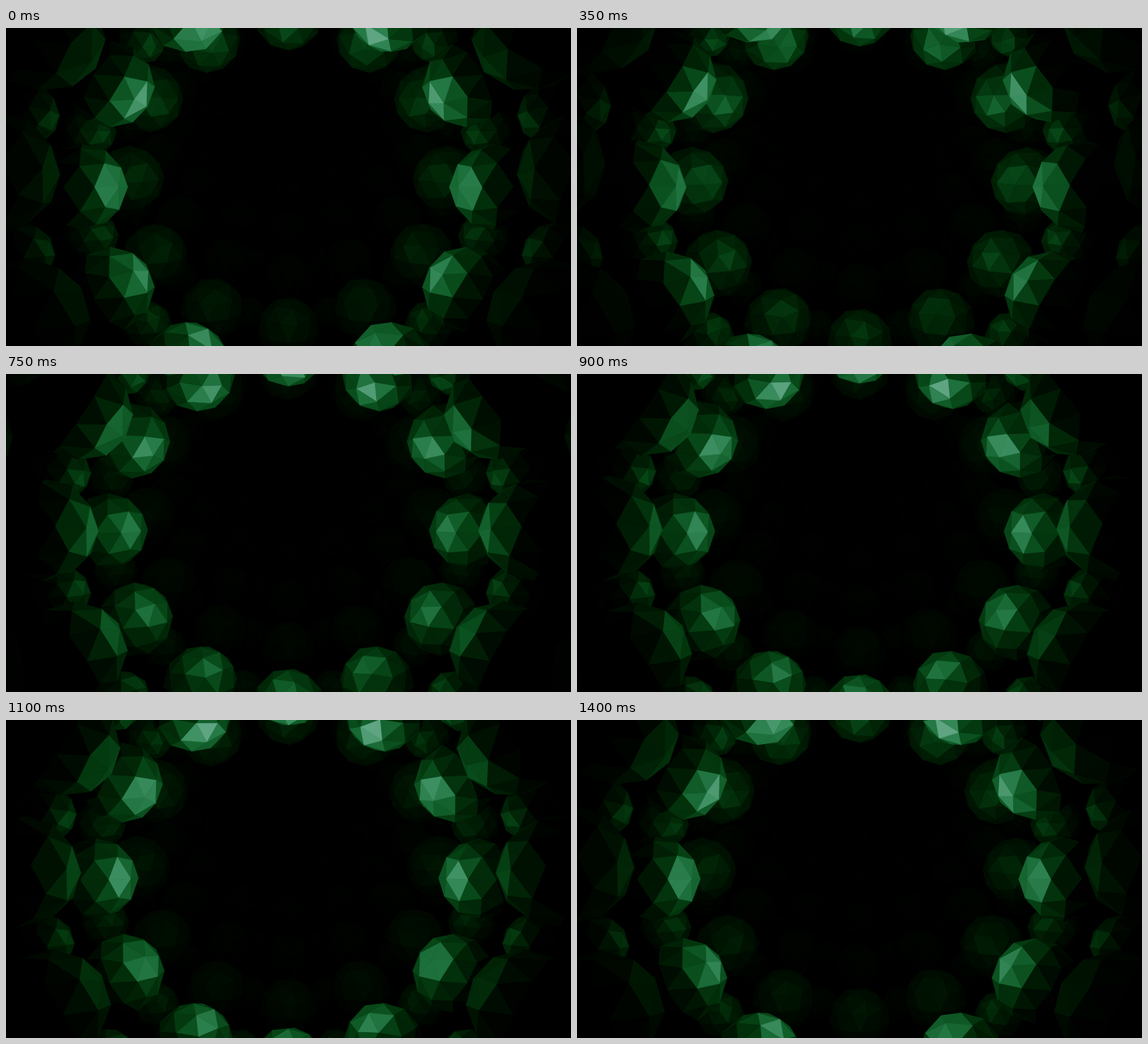
These frames come from a looping animation (960 by 540 pixels, 1.45 s). An HTML page with a canvas:

```html
<!DOCTYPE html>
<html lang="en">
<head>
<meta charset="utf-8">
<title>Green tunnel</title>
<style>
  html, body { margin: 0; height: 100%; overflow: hidden; background: #000; }
  canvas { display: block; }
</style>
</head>
<body>
<canvas id="stage" width="960" height="540"></canvas>
<script>
const ctx = document.getElementById('stage').getContext('2d');
ctx.lineWidth = 0.6;
ctx.lineJoin = 'round';

const LOOP = 1450, STEP = 50;
const FOCAL = 861;
const BEND = 7.31;        // radius of the curved tunnel
const RING_ANGLE = 0.14;  // turn between two rings
const LOW_POINT = 3.36;   // depth where the tunnel runs parallel to the view
const LIGHT_Z = 3.6;
const BIG = { ring: 1.365, size: 0.285, shift: 0, glow: 1.4 };
const SMALL = { ring: 1.56, size: 0.19, shift: Math.PI / 12, glow: 0.6 };

const dot = (a, b) => a[0] * b[0] + a[1] * b[1] + a[2] * b[2];
const unit = v => v.map(c => c / Math.hypot(...v));
const add = (...vs) => [0, 1, 2].map(i => vs.reduce((s, v) => s + v[i], 0));
const rise = (z, middle) => 1 / (1 + Math.exp((middle - z) * 4));
// Turn a vector with the ring around the horizontal axis.
const tilt = ([x, y, z], c, s) => [x, y * c + z * s, z * c - y * s];

// Icosahedron standing on a corner, each face split in four.
function makeBall() {
  const corner = (deg, up) => {
    const a = deg * Math.PI / 180;
    return unit([-Math.cos(a) * 2, up, -Math.sin(a) * 2]);
  };
  const top = [0, 1, 0], bottom = [0, -1, 0], faces = [];
  const split = (a, b, c) => {
    const ab = unit(add(a, b)), bc = unit(add(b, c)), ca = unit(add(c, a));
    for (const points of [[a, ab, ca], [ab, b, bc], [ca, bc, c], [ab, bc, ca]])
      faces.push({ points, normal: unit(add(...points)) });
  };
  for (let i = 0; i < 5; i++) {
    const u = corner(36 + 72 * i, 1), u2 = corner(108 + 72 * i, 1);
    const l = corner(72 * i, -1), l2 = corner(72 + 72 * i, -1);
    split(top, u, u2);
    split(bottom, l, l2);
    split(u, l, l2);
    split(l2, u, u2);
  }
  return faces;
}
const ball = makeBall();

function ringBalls(index, kind) {
  const phi = index * RING_ANGLE, c = Math.cos(phi), s = Math.sin(phi);
  const middle = [0, BEND * (1 - c), LOW_POINT + BEND * s];
  return Array.from({ length: 12 }, (_, i) => {
    const a = i * Math.PI / 6 + kind.shift;
    const radial = tilt([Math.cos(a), Math.sin(a), 0], c, s);
    const center = add(middle, radial.map(v => v * kind.ring));
    const z = center[2];
    const light = unit([-radial[0] * 0.75, -radial[1] * 0.75, LIGHT_Z - z]);
    const view = unit(center.map(v => -v));
    return {
      center, c, s, light,
      size: kind.size,
      half: unit(add(light, view)),
      glow: kind.glow * rise(z, 2.65) * rise(-z, -4.05) * (0.94 + 0.14 * Math.sin(a)),
      haze: 0.045 * rise(z, 3.7) * Math.min(1, Math.exp((4.4 - z) / 2))
    };
  });
}

function shade(normal, b) {
  const diffuse = Math.max(0, 0.2 + 0.8 * dot(normal, b.light));
  const shine = Math.max(0, dot(normal, b.half)) ** 10;
  const haze = b.haze * Math.max(0, 0.7 * normal[1] - 0.7 * normal[2]);
  const k = Math.min(1, b.glow * (0.4 * diffuse + 0.5 * shine) + haze);
  return `rgb(${Math.round(95 * k ** 3)},${Math.round(165 * k)},${Math.round(130 * k * k)})`;
}

function drawBall(b) {
  const reach = b.size * FOCAL * 1.4 / b.center[2];
  const x = FOCAL * b.center[0] / b.center[2], y = FOCAL * b.center[1] / b.center[2];
  if (Math.abs(x) > 480 + reach || Math.abs(y) > 270 + reach) return;
  const place = p => add(b.center, tilt(p, b.c, b.s).map(v => v * b.size));
  for (const face of ball) {
    const normal = tilt(face.normal, b.c, b.s);
    const points = face.points.map(place);
    if (dot(normal, points[0]) >= 0) continue;
    ctx.fillStyle = ctx.strokeStyle = shade(normal, b);
    ctx.beginPath();
    for (const [px, py, pz] of points)
      ctx.lineTo(480 + FOCAL * px / pz, 270 - FOCAL * py / pz);
    ctx.closePath();
    ctx.fill();
    ctx.stroke();
  }
}

function draw(progress) {
  ctx.fillStyle = '#000';
  ctx.fillRect(0, 0, 960, 540);
  const balls = [];
  for (let k = -2; k < 8; k++) {
    balls.push(...ringBalls(k - progress, BIG), ...ringBalls(k + 0.5 - progress, SMALL));
  }
  balls.filter(b => b.center[2] > 1)
    .sort((a, b) => dot(b.center, b.center) - dot(a.center, a.center))
    .forEach(drawBall);
}

let shown = -1;
function tick() {
  const step = Math.floor(performance.now() % LOOP / STEP);
  if (step !== shown) draw((shown = step) * STEP / LOOP);
  requestAnimationFrame(tick);
}
tick();
</script>
</body>
</html>
```
